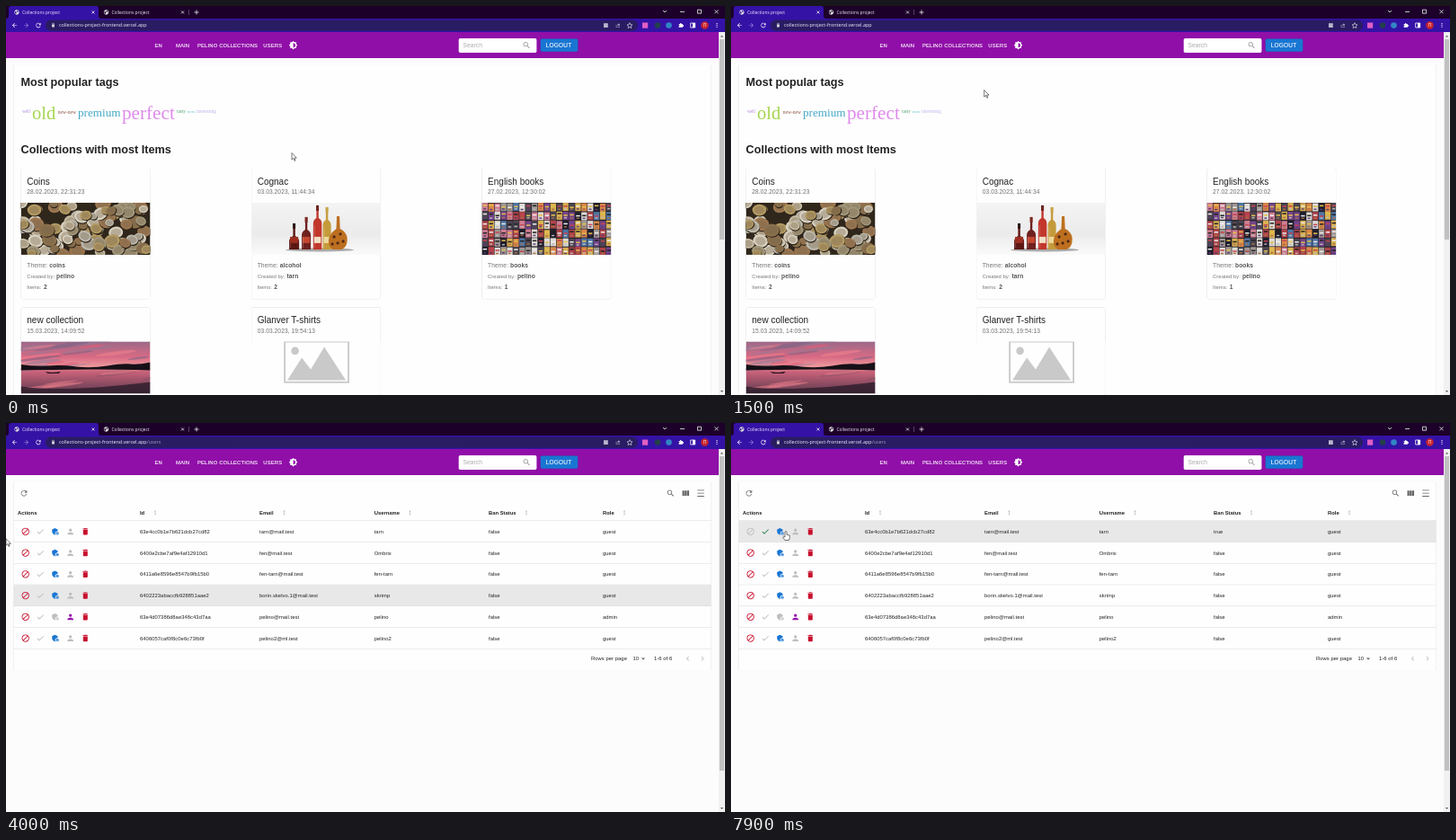
These frames come from a looping animation (800 px wide and 433 px high, 8000 ms). An HTML page:

```html
<!DOCTYPE html>
<html lang="en">
<head>
<meta charset="utf-8">
<title>Collections project</title>
<style>
html, body { margin: 0; width: 100%; height: 100%; overflow: hidden; background: #fdfcfd; }
svg { display: block; }
text { font-family: "Liberation Sans", Arial, sans-serif; letter-spacing: .01em; white-space: pre; }
.ui { font-family: "Open Sans", "Noto Sans", sans-serif; letter-spacing: 0; }
.serif { font-family: "Liberation Serif", "Times New Roman", serif; letter-spacing: 0; }
.head { font-weight: bold; letter-spacing: 0; }
.title { letter-spacing: 0; }
.caps { letter-spacing: .0286em; stroke: #fff; stroke-width: .12; }
.bold { font-weight: bold; }
.mid { text-anchor: middle; }
.paper { fill: #fefefe; }
.paper, .raised { filter: drop-shadow(0 .8px .5px #0004); }
.line { fill: none; stroke-width: .8; }
</style>
</head>
<body>
<svg id="stage" width="800" height="433" viewBox="0 0 800 433"></svg>
<script>
const icons = {
  search: 'M15.5 14h-.79l-.28-.27C15.41 12.59 16 11.11 16 9.5 16 5.91 13.09 3 9.5 3S3 5.91 3 9.5 5.91 16 9.5 16c1.61 0 3.09-.59 4.23-1.57l.27.28v.79l5 4.99L20.49 19l-4.99-5zm-6 0C7.01 14 5 11.99 5 9.5S7.01 5 9.5 5 14 7.01 14 9.5 11.99 14 9.5 14z',
  theme: 'M20 15.31L23.31 12 20 8.69V4h-4.69L12 .69 8.69 4H4v4.69L.69 12 4 15.31V20h4.69L12 23.31 15.31 20H20v-4.69zM12 18V6c3.31 0 6 2.69 6 6s-2.69 6-6 6z',
  ban: 'M12 2a10 10 0 1 0 0 20a10 10 0 1 0 0-20zM4 12c0-4.42 3.58-8 8-8 1.85 0 3.55.63 4.9 1.69L5.69 16.9C4.63 15.55 4 13.85 4 12zm8 8c-1.85 0-3.55-.63-4.9-1.69L18.31 7.1C19.37 8.45 20 10.15 20 12c0 4.42-3.58 8-8 8z',
  check: 'M9 16.2L4.8 12l-1.4 1.4L9 19 21 7l-1.4-1.4L9 16.2z',
  shield: 'M17 11c.34 0 .67.04 1 .09V6.27L10.5 3 3 6.27v4.91c0 4.54 3.2 8.79 7.5 9.82.55-.13 1.08-.32 1.6-.55-.69-.98-1.1-2.17-1.1-3.45 0-3.31 2.69-6 6-6zM17 13a4 4 0 1 0 0 8a4 4 0 1 0 0-8zm0 1.4a1.1 1.1 0 1 1 0 2.2a1.1 1.1 0 1 1 0-2.2zm-2.3 4.2q2.3-1.6 4.6 0q-2.3 2.4-4.6 0z',
  person: 'M12 12a4 4 0 1 0 0-8a4 4 0 1 0 0 8zm0 2c-2.67 0-8 1.34-8 4v2h16v-2c0-2.66-5.33-4-8-4z',
  bin: 'M6 19c0 1.1.9 2 2 2h8c1.1 0 2-.9 2-2V7H6v12zM19 4h-3.5l-1-1h-5l-1 1H5v2h14V4z',
  reload: 'M17.65 6.35A8 8 0 1 0 19.73 14h-2.08A6 6 0 1 1 16.22 7.78L13 11h7V4l-2.35 2.35z',
  columns: 'M3 5h5.3v14H3zM9.3 5h5.4v14H9.3zM15.7 5H21v14h-5.3z',
  rows: 'M3 3h18v2H3zM3 11h18v2H3zM3 19h18v2H3z',
  dots: 'M12 4a2 2 0 1 0 .01 0zM12 10a2 2 0 1 0 .01 0zM12 16a2 2 0 1 0 .01 0z',
  left: 'M15.41 7.41L14 6l-6 6 6 6 1.41-1.41L10.83 12z',
  right: 'M10 6L8.59 7.41 13.17 12l-4.58 4.59L10 18l6-6z',
  drop: 'M7 10l5 5 5-5z',
  back: 'M20 11H7.83l5.59-5.59L12 4l-8 8 8 8 1.41-1.41L7.83 13H20z',
  ahead: 'M4 11h12.17l-5.59-5.59L12 4l8 8-8 8-1.41-1.41L16.17 13H4z',
  lock: 'M18 8h-1V6A5 5 0 0 0 7 6v2H6v14h12zM9 8V6a3 3 0 0 1 6 0v2z',
  globe: 'M12 2a10 10 0 1 0 .01 0zM5 8l5 2 1 4-3 5-4-6zM14 4l5 5-4 3-3-4z',
  share: 'M3 9h2v10h12v-4h2v6H3zM14 3l7 6-7 6v-4q-5 0-7 4q1-8 7-8z',
  puzzle: 'M3 8h5a3 3 0 1 1 6 0h5v5a3 3 0 1 1 0 5v4H3v-5a3 3 0 1 0 0-6z'
};

const text = (x, y, size, s, fill = '#222', cls = '') =>
  `<text x="${x}" y="${y}" font-size="${size}" fill="${fill}" class="${cls}">${s}</text>`;
const rect = (x, y, w, h, fill, extra = '') =>
  `<rect x="${x}" y="${y}" width="${w}" height="${h}" fill="${fill}" ${extra}/>`;
const circle = (x, y, r, fill, extra = '') => `<circle cx="${x}" cy="${y}" r="${r}" fill="${fill}" ${extra}/>`;
const ellipse = (x, y, rx, ry, fill, extra = '') =>
  `<ellipse cx="${x}" cy="${y}" rx="${rx}" ry="${ry}" fill="${fill}" ${extra}/>`;
const path = (d, fill, extra = '') => `<path d="${d}" fill="${fill}" ${extra}/>`;
const line = (d, color, extra = '') => `<path class="line" d="${d}" stroke="${color}" ${extra}/>`;
const icon = (name, x, y, fill, k = 10 / 24) =>
  path(icons[name], fill, `fill-rule="evenodd" transform="translate(${x - 12 * k} ${y - 12 * k}) scale(${k})"`);
const group = (id, body) => `<g id="${id}">${body}</g>`;
const cross = (x, y, r) => line(`M${x - r} ${y - r}l${2 * r} ${2 * r}m0 ${-2 * r}l${-2 * r} ${2 * r}`, '#eee');

let seed = 11;
const rnd = () => (seed = seed * 16807 % 2147483647) / 2147483647;
const pick = list => list[Math.floor(rnd() * list.length)];

function browser() {
  const tab = x => icon('globe', x + 12, 7, '#ddd', .27) +
    text(x + 18, 8.9, 4.9, 'Collections project', '#f2eefa', 'ui') + cross(x + 97, 7, 1.5);
  return rect(0, 0, 800, 14, '#1c0029') +
    path('M0 14Q3 14 3 11V3Q3 0 6 0H100Q103 0 103 3V11Q103 14 106 14Z', '#3512a6') +
    rect(0, 14, 800, 15, '#3512a6') + rect(44, 15.5, 659, 12.2, '#2a1c62', 'rx="6"') +
    tab(0) + tab(99.5) + line('M203.5 4V10', '#665074') + line('M209.5 7H214.5M212 4.5V9.5', '#eee') +
    line('M731 5l2 2 2-2M750 6.5H755M769.5 4.2h4v4h-4z', '#eee') + cross(790.5, 6.3, 2) +
    icon('back', 9.5, 21.5, '#fff', .32) + icon('ahead', 22.5, 21.5, '#9d88d8', .32) +
    icon('reload', 36, 21.5, '#fff', .33) + icon('lock', 52.5, 21.3, '#ddd', .23) +
    text(59, 23.4, 5.45, 'collections-project-frontend.vercel.app<tspan id="route" fill="#a09bb8">/users</tspan>', '#f5f2ff', 'ui') +
    rect(665, 19.2, 4.8, 4.8, '#b8b3cc') + icon('share', 681, 21.5, '#b8b3cc', .25) +
    line('M694 18.7l.9 2 2.1.2-1.6 1.5.5 2.2-1.9-1.2-1.9 1.2.5-2.2-1.6-1.5 2.1-.2z', '#c8c4d8') +
    rect(708, 18.5, 6.2, 6.2, '#e05fc4') + circle(725, 21.6, 3.3, '#23404a') +
    circle(737.5, 21.6, 3.3, '#3186c4') + icon('puzzle', 751, 21, '#fff', .27) +
    line('M761.7 19h5v5h-5z', '#fff') + rect(764, 19, 2.7, 5, '#fff') +
    circle(777.5, 21.5, 4.2, '#c9252d') + text(777.5, 23.3, 5, 'П', '#fff', 'ui mid') +
    icon('dots', 791, 21.5, '#fff', .3);
}

function appBar() {
  const nav = [[165.5, 'EN'], [189, 'MAIN'], [213, 'PELINO COLLECTIONS'], [286.3, 'USERS']];
  return rect(0, 29, 793, 29, '#900fa8', 'class="raised"') +
    nav.map(([x, s]) => text(x, 45.8, 5.83, s, '#fff', 'caps')).join('') +
    icon('theme', 319.6, 43.7, '#fff') +
    rect(503.7, 36, 86.7, 16, '#fff', 'rx="1.7"') + text(508.5, 45.9, 6.67, 'Search', '#aaa') +
    icon('search', 579.3, 43.7, '#9a9a9a') +
    rect(594.7, 36.6, 41.6, 14.2, '#1976d2', 'rx="1.7" class="raised"') + text(600.8, 46, 6.5, 'LOGOUT', '#fff', 'caps');
}

function coins() {
  let s = rect(0, 0, 144, 58, '#30271c');
  for (let i = 0; i < 110; i++) {
    const x = rnd() * 144, y = rnd() * 58, r = 4.5 + rnd() * 4.5, turn = `transform="rotate(${rnd() * 60 - 30} ${x} ${y})"`;
    s += ellipse(x + .8, y + 1, r, r * .82, '#2b2218', turn) +
      ellipse(x, y, r, r * .82, pick(['#c9bea6', '#a3977b', '#b39a63', '#d8d1c0', '#8a704c', '#9c7650', '#bcb8ac']), turn) +
      ellipse(x, y, r * .72, r * .56, '#75664c', 'opacity=".35" ' + turn);
  }
  return s;
}

function bottles() {
  const bottle = (x, top, w, glass, label, cap) =>
    path(`M${x - 1.2} ${top}h2.4V${top + 14}q${w / 2 - 1.2} 2 ${w / 2 - 1.2} 6V52H${x - w / 2}V${top + 20}q0-4 ${w / 2 - 1.2}-6z`, glass) +
    rect(x - w / 2 + 1, 38, w - 2, 7, label) + rect(x - 1.5, top, 3, 6, cap) +
    line(`M${x - w / 2 + 1.5} ${top + 22}V50`, '#fff', 'opacity=".25"');
  return rect(0, 0, 144, 58, 'url(#studio)') + ellipse(76, 52.5, 38, 2, '#aaa') +
    bottle(47.5, 23, 11, '#5c1713', '#9c2f22', '#2b1714') + bottle(61, 16, 10, '#6e211f', '#c4472f', '#7d2a24') +
    bottle(73.5, 3, 9.5, '#c2372c', '#f0dfc4', '#6b221e') + bottle(84, 5, 9, '#c49a3a', '#ecd79a', '#c9a24a') +
    path('M95 15h3l.6 14q8 4 8 12t-6 11H90q-5-4-4-11t8.400-12z', '#bd6f1f') +
    [[92, 38], [99, 35], [96, 45], [102, 43], [90, 46]].map(([x, y]) => circle(x, y, 1.6, '#4e2715')).join('');
}

function books() {
  let s = rect(0, 0, 144, 58, '#28232c');
  for (let i = 0; i < 126; i++) {
    const x = i % 21 * 6.9, y = Math.floor(i / 21) * 9.8 + rnd();
    s += rect(x + .3, y, 6.3, 9, pick(['#1f1d2b', '#b0434a', '#d9b050', '#dedad5', '#74458c', '#4f76a6', '#cf7d92', '#4b4550', '#a09893', '#d98748'])) +
      rect(x + 1.2, y + 1.3 + rnd() * 3, 4.4, 1.5, pick(['#eee', '#e5c04b', '#222', '#c74352'])) +
      rect(x + 1.7, y + 6, 3, 1.4, pick(['#bbb', '#5a3c72', '#a87246']));
  }
  return s;
}

function sunset() {
  let s = rect(0, 0, 144, 58, 'url(#dusk)');
  const streaks = (n, top, depth, colors) => {
    for (let i = 0; i < n; i++)
      s += ellipse(rnd() * 144, top + rnd() * depth, 10 + rnd() * 20, .8 + rnd() * 1.4, pick(colors), 'opacity=".6" transform="rotate(-7 72 12)"');
  };
  streaks(26, -4, 30, ['#f0808c', '#7d6585', '#e2607a', '#947b96']);
  streaks(8, 36, 14, ['#e57a88', '#8a5268']);
  return s + path('M0 25.500Q14 28 30 27T62 28 96 27 122 25 144 23V32Q110 31 80 31T0 32Z', '#171017') +
    path('M27 33.5q8 2 17 0l-2 2H30z', '#170e18') + path('M0 50Q50 57 144 45V58H0Z', '#2c1c2b', 'opacity=".8"');
}

const placeholder = () => rect(0, 0, 144, 58, '#fefefe') +
  rect(37, .2, 71, 45.2, '#fefefe', 'stroke="#c9c9c9" stroke-width="1.8"') +
  circle(48.5, 10.5, 4.3, '#c9c9c9') + path('M40 43L56 18 66 31 81 6 105 43Z', '#c9c9c9');

function home() {
  const tags = [
    [18, 119.3, 5.2, 'well', '#b184dc'], [29, 125.6, 20.5, 'old', '#a6d552'], [57.8, 119.6, 5.5, 'new-new', '#8d5446'],
    [80, 122.6, 13.2, 'premium', '#45a9c6'], [129, 125.6, 21.2, 'perfect', '#df8aec'], [190, 119.3, 5.2, 'tasty', '#4ea06b'],
    [202, 119.3, 5, 'new', '#62bfd0'], [212, 119.3, 5.2, 'interesting', '#bfb0ee']
  ];
  const cards = [
    ['Coins', '28.02.2023, 22:31:23', coins, 'coins', 'pelino', 2],
    ['Cognac', '03.03.2023, 11:44:34', bottles, 'alcohol', 'tarn', 2],
    ['English books', '27.02.2023, 12:30:02', books, 'books', 'pelino', 1],
    ['new collection', '15.03.2023, 14:09:52', sunset],
    ['Glanver T-shirts', '03.03.2023, 19:54:13', placeholder]
  ];
  const card = ([title, date, photo, theme, owner, count], i) => {
    const field = (y, size, label, x, value) =>
      text(6.6, y, size, label, '#777') + text(x, y, 6.67, value, '#555', 'bold');
    return `<g transform="translate(${16.7 + i % 3 * 256.4} ${i < 3 ? 181 : 335.5})">` +
      rect(0, 0, 143.6, 145.3, '', 'rx="1.7" class="paper"') +
      text(6.6, 17.6, 10, title, '#222', 'title') + text(6.6, 28, 6.67, date, '#707070') +
      `<svg y="37.9" width="143.6" height="58">${photo()}</svg>` +
      (theme ? field(109.8, 6.67, 'Theme:', 31.6, theme) + field(122.2, 5.83, 'Created by:', 39.4, owner) +
        field(134.2, 5.83, 'Items:', 25.2, count) : '') + '</g>';
  };
  return rect(8.3, 66, 776.5, 400, '', 'rx="1.7" class="paper"') +
    text(16.6, 88.6, 12.65, 'Most popular tags', '#222', 'head') +
    tags.map(t => text(...t, 'serif')).join('') +
    text(16.6, 164.3, 12.65, 'Collections with most Items', '#222', 'head') + cards.map(card).join('');
}

const red = '#c8102e', blue = '#1976d2', off = '#bdbdbd', violet = '#9410ac', green = '#1f7a45';
const rowTop = i => 109 + i * 23.75;

function people() {
  const list = [
    ['63e4cc0b1e7b621dcb27cd82', 'tarn@mail.test', 'tarn'],
    ['6400e2cbe7af9e4af12910d1', 'fen@mail.test', 'Ombrix'],
    ['6411a6e8596e8547b9fb15b0', 'fen-tarn@mail.test', 'fen-tarn'],
    ['6402223abaccfb928851aae2', 'borin.skelvo.1@mail.test', 'skrimp'],
    ['63e4d07386d8ae348c43d7aa', 'pelino@mail.test', 'pelino'],
    ['6406057caf0f8c0e6c73fb0f', 'pelino2@ml.test', 'pelino2']
  ];
  const heads = [[149, 'Id', 166], [282, 'Email', 309.5], [409.7, 'Username', 449.5], [537, 'Ban Status', 579], [664, 'Role', 688]];
  const status = (y, banned) => icon('ban', 21.7, y, banned ? off : red) +
    icon('check', 38.3, y, banned ? green : off) + text(537, y + 2, 5.83, String(banned));
  const row = ([id, mail, name], i) => {
    const y = rowTop(i) + 11.8, admin = i === 4;
    return (i ? status(y, false) : group('open', status(y, false)) + group('banned', status(y, true))) +
      icon('shield', 55, y, admin ? off : blue) + icon('person', 71.7, y, admin ? violet : off) + icon('bin', 88.3, y, red) +
      text(149, y + 2, 5.83, id) + text(282, y + 2, 5.83, mail) + text(409.7, y + 2, 5.83, name) +
      text(664, y + 2, 5.83, admin ? 'admin' : 'guest') + rect(8.3, rowTop(i + 1) - .5, 776.5, .5, '#d9d9d9');
  };
  return rect(8.3, 66, 776.5, 209, '', 'rx="1.7" class="paper"') + rect(8.3, 0, 776.5, 23.6, '#e9e8e9', 'id="hover"') +
    icon('reload', 20, 78.2, '#666') + icon('search', 739.5, 78.2, '#666') +
    icon('columns', 756.3, 78.2, '#666') + icon('rows', 773, 78.2, '#666') +
    text(13, 102, 5.83, 'Actions', '#222', 'head') +
    heads.map(([x, s, dots]) => text(x, 102, 5.83, s, '#222', 'head') + icon('dots', dots, 100, '#999', .3)).join('') +
    rect(8.3, 108.5, 776.5, .5, '#d9d9d9') + list.map(row).join('') +
    text(651, 264.3, 5.83, 'Rows per page') + text(697.5, 264.3, 5.83, '10') + icon('drop', 709, 262.4, '#666') +
    text(721, 264.3, 5.83, '1-6 of 6') + icon('left', 758.5, 262.2, off) + icon('right', 775, 262.2, off) +
    group('tip', rect(-11.7, 97.2, 23.4, 9.6, '#666', 'rx="1.7" id="tipBox"') +
      '<text id="tipText" class="mid bold" y="103.5" font-size="4.5" fill="#fff"></text>');
}

const scrollbar = () => rect(793, 29, 7, 404, '#f1f1f1') + rect(793.9, 37, 5.2, 223, '#c1c1c1', 'id="thumb"') +
  path('M794.8 34.5l1.7-2 1.7 2zM794.8 428l1.7 2 1.7-2z', '#666');

const pointer = () => group('pointer',
  path('M0 0V7.6L1.8 6 3 8.8 4.1 8.3 2.9 5.6H5.3Z', '#fff', 'id="arrow" stroke="#222" stroke-width=".6"') +
  path('M-1 .7Q0-.7 1 .7V3.8L4.3 4.6V7.4L3.4 10H-1.1L-3.3 6.4Q-3 5-1 6.4Z', '#fff', 'id="hand" stroke="#222" stroke-width=".6"'));

const stage = document.getElementById('stage');
stage.innerHTML = `<defs>
  <linearGradient id="studio" x2="0" y2="1"><stop stop-color="#f4f4f4"/><stop offset=".6" stop-color="#ebebeb"/><stop offset="1" stop-color="#fafafa"/></linearGradient>
  <linearGradient id="dusk" x2="0" y2="1"><stop stop-color="#9a6a88"/><stop offset=".3" stop-color="#d96a84"/><stop offset=".48" stop-color="#eb9a9c"/><stop offset=".58" stop-color="#c9627a"/><stop offset="1" stop-color="#5c3a4e"/></linearGradient>
  </defs>` + group('home', home()) + group('people', people()) + appBar() + scrollbar() + browser() + pointer();

const el = id => document.getElementById(id);
const show = (id, on) => el(id).setAttribute('visibility', on ? 'visible' : 'hidden');

// Pointer path: time, x, y
const route = [
  [0, 318, 163.5], [600, 374.7, 171], [900, 366, 160], [1500, 281.7, 93.5], [2000, 297, 60], [2300, 300.5, 44],
  [2700, 300.5, 44], [3000, 250, 115], [3500, 130, 188], [3800, 30, 186], [4000, 0, 128.7], [4500, 0, 128.7],
  [4800, 20, 126], [5300, 34, 120.3], [5400, 34, 120.3], [5600, 21.5, 121], [6100, 21.5, 121], [6500, 38, 121],
  [7300, 38, 121], [7800, 61, 120.5], [8000, 61, 120.5]
];
// Steps: start time, value
const hoverSteps = [[0, -1], [3000, 0], [3100, 1], [3300, 2], [3500, 3], [4600, -1], [4800, 0]];
const handSteps = [[0, false], [2200, true], [2800, false], [5500, true], [5700, false], [6300, true]];
const tipSteps = [[0, ''], [5200, 'Unblock'], [5500, 'Block'], [6300, 'Unblock'], [7500, '']];
const stepAt = (steps, t) => steps.filter(s => s[0] <= t).pop()[1];

function place(t) {
  const i = route.findIndex(k => k[0] > t), a = route[i - 1], b = route[i];
  const p = (t - a[0]) / (b[0] - a[0]);
  return [a[1] + (b[1] - a[1]) * p, a[2] + (b[2] - a[2]) * p];
}

function draw(now) {
  const t = Math.floor(now % 8000 / 100) * 100;
  const left = t >= 2700, loaded = t >= 2800, banned = t >= 5700;
  const row = stepAt(hoverSteps, t), hand = stepAt(handSteps, t), tip = stepAt(tipSteps, t);
  show('home', !left);
  show('route', left);
  show('people', loaded);
  show('open', loaded && !banned);
  show('banned', banned);
  show('hover', loaded && row >= 0);
  el('hover').setAttribute('y', rowTop(Math.max(row, 0)));
  el('thumb').setAttribute('height', left ? 350 : 223);
  show('tip', tip);
  el('tip').setAttribute('transform', `translate(${tip === 'Block' ? 21.7 : 38.3})`);
  const half = tip === 'Block' ? 9.3 : 11.7;
  el('tipBox').setAttribute('x', -half);
  el('tipBox').setAttribute('width', 2 * half);
  el('tipText').textContent = tip;
  show('arrow', !hand);
  show('hand', hand);
  el('pointer').setAttribute('transform', `translate(${place(t)})`);
}

const start = performance.now();
function tick() {
  draw(performance.now() - start);
  requestAnimationFrame(tick);
}
tick();
</script>
</body>
</html>
```
